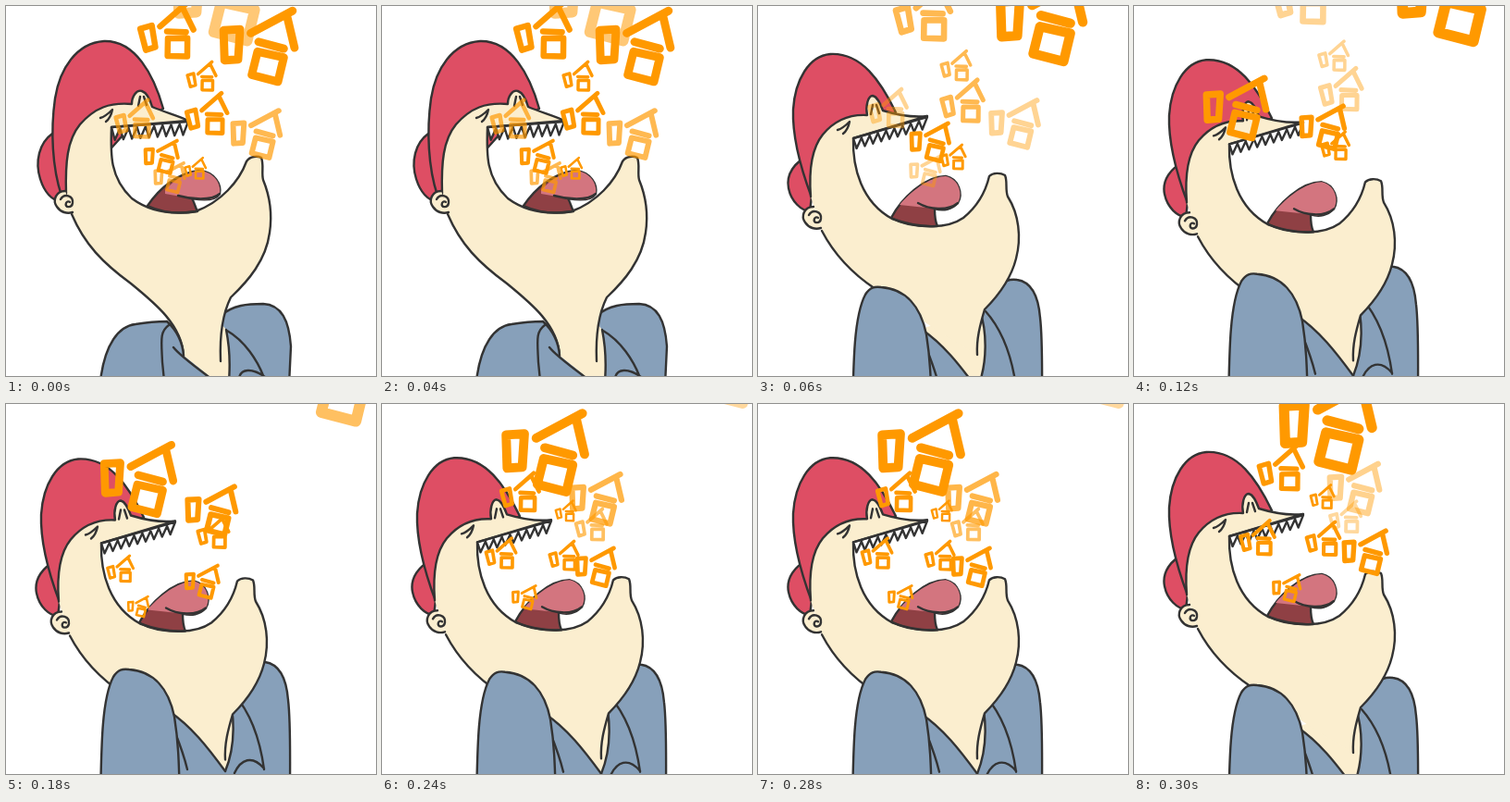
Animation, 400 px wide and 400 px high, one loop 0.36 s. Source, as an HTML page:

```html
<!DOCTYPE html>
<html lang="zh">
<head>
<meta charset="utf-8">
<title>哈哈哈</title>
<style>
  html, body { margin: 0; width: 100%; height: 100%; overflow: hidden; background: #fff; }
  svg { display: block; width: 100vw; height: 100vh; }
  .ln { fill: none; }
  .pose { stroke: #333; stroke-width: 2.4; stroke-linecap: round; stroke-linejoin: round; }
  .skin { fill: #fbeecf; }
  .red { fill: #de4e64; }
  .blue { fill: #87a0ba; }
  .dark { fill: #8f4044; }
  .pink { fill: #d3757f; }
  .white { fill: #fff; }
  .bare { stroke: none; }
  #laughs { fill: none; stroke: #ff9900; stroke-width: 8.5; stroke-linecap: round; stroke-linejoin: round; }
</style>
</head>
<body>
<svg viewBox="0 0 400 400" role="img" aria-label="哈哈哈">
  <g id="low" class="pose"></g>
  <g id="high" class="pose"></g>
  <g id="laughs"></g>
</svg>
<script>
(() => {
  const STEP = 60, COUNT = 6;
  const byId = id => document.getElementById(id);

  function add(parent, tag, attrs) {
    const el = document.createElementNS('http://www.w3.org/2000/svg', tag);
    for (const k in attrs) el.setAttribute(k, attrs[k]);
    parent.appendChild(el);
    return el;
  }
  const group = (parent, shift = '0,0') => add(parent, 'g', { transform: `translate(${shift})` });
  const draw = (parent, cls, d) => add(parent, 'path', { class: cls, d });

  function teeth(parent, x0, y0, x1, y1, n, h) {
    let d = `M${x0},${y0}`;
    for (let i = 0; i < n; i++) {
      const at = (p, drop) => `L${x0 + (x1 - x0) * p / n},${y0 + (y1 - y0) * p / n + drop}`;
      d += at(i + 0.4, h) + at(i + 1, i < n - 1 ? 2 : 0);
    }
    draw(parent, 'white', d + 'Z');
  }

  function head(g, p) {
    draw(g, 'red', p.flap);
    draw(g, 'red', p.cap);
    draw(g, 'skin bare', p.brow + p.jaw + p.base + 'L' + p.cheek);
    draw(g, 'dark', p.mouth);
    draw(g, 'pink bare', p.tongue);
    draw(g, 'ln', p.fold);
    teeth(g, ...p.teeth);
    draw(g, 'ln', p.brow + p.jaw);
    draw(g, 'ln', 'M' + p.cheek);
    const ear = group(g, p.ear);
    draw(ear, 'skin', 'M60,217 C50,217 46,227 51,234 C55,240 62,242 68,240');
    draw(ear, 'ln', 'M55,226 C59,219 69,222 68,230 C67,236 59,235 61,230 C62,228 64,228 65,229');
    draw(group(g, p.eye), 'ln', 'M86,134 C90,133 95,129 99,125 C98,130 96,135 92,138');
    draw(group(g, p.lid), 'ln', 'M122,117 L124,107 M128,107 L131,116');
  }

  // Leaning forward
  const low = byId('low');
  draw(low, 'blue', 'M232,335 C245,323 262,322 278,322 C298,323 306,340 308,368 L306,410 L225,410 Z');
  draw(low, 'skin bare', 'M230,340 L238,350 C241,365 243,380 241,405 L215,405 Z');
  draw(low, 'ln', 'M238,350 C241,365 243,380 241,405 M239,351 C258,362 272,383 279,402 M252,402 C254,392 266,391 280,401');
  head(low, {
    flap: 'M50,138 C36,148 31,168 37,187 C42,203 50,210 60,212 L66,170 Z',
    cap: 'M60,205 C50,175 48,135 53,100 C58,68 76,40 106,38 C140,37 160,75 170,111 L135,130 L66,207 Z',
    brow: 'M65,203 C64,170 66,145 80,128 C96,110 112,104 136,106 C136,98 141,90 147,92 C153,94 156,102 158,109 C172,115 188,119 197,124 L114,131',
    jaw: 'C113,160 112,185 136,208 C155,222 180,226 205,222 C232,212 252,190 260,168 C264,162 272,162 276,164 C279,172 276,180 278,188 C285,205 288,225 285,245 C281,275 262,297 243,315 C233,335 231,360 232,384',
    base: 'L240,400 L215,405',
    cheek: '192,378 C190,345 162,322 135,300 C105,278 85,258 71,225',
    mouth: 'M153,216 C165,198 185,180 210,178 C226,180 233,193 231,203 C226,211 212,210 201,208 C204,213 205,219 207,222 C188,225 168,223 153,216 Z',
    tongue: 'M172,199 C183,187 197,179 210,178 C226,180 233,193 231,203 C226,211 212,210 201,208 L172,203 Z',
    fold: 'M231,203 C222,211 200,209 186,205',
    teeth: [114, 131, 197, 125, 9, 14],
    ear: '4,-17', eye: '16,-13', lid: '21,-9'
  });
  draw(low, 'blue bare', 'M102,405 C107,365 122,346 140,344 C152,342 164,341 174,341 C186,352 192,365 192,378 C202,386 212,393 224,405 Z');
  draw(low, 'ln', 'M102,405 C107,365 122,346 140,344 C152,342 164,341 174,341 M176,345 C166,352 168,362 169,385 L171,405 M181,369 C188,378 202,388 222,403 M174,341 C186,352 191,365 192,378');

  // Leaning back
  const high = byId('high');
  const back = group(high), face = group(high), front = group(high);
  draw(back, 'blue', 'M240,330 C255,310 262,293 280,296 C294,298 303,312 305,337 C308,362 307,390 307,450 L200,450 Z');
  draw(back, 'skin bare', 'M176,349 L240,330 C247,350 249,385 237,414 Z');
  draw(back, 'ln', 'M240,330 C247,350 249,385 237,414 M246,330 C262,348 274,375 279,412 M247,416 C254,401 266,396 279,411');
  head(face, {
    flap: 'M54,163 C40,168 30,182 33,197 C36,212 47,221 56,222 L60,190 Z',
    cap: 'M58,207 C46,175 37,140 38,112 C40,80 55,54 78,52 C112,50 133,82 149,115 L110,130 L58,207 Z',
    brow: 'M57,206 C55,180 57,155 70,139 C84,122 100,117 118,118 C116,108 119,97 124,97 C129,98 132,105 135,113 C148,117 165,121 183,119 L103,143',
    jaw: 'C102,175 112,212 145,230 C175,241 205,241 222,229 C238,216 246,201 250,184 C254,180 262,180 267,183 C270,190 267,198 270,206 C282,225 285,250 279,273 C273,297 258,315 245,328 C240,345 236,360 237,377',
    base: 'L200,355',
    cheek: '127,306 C100,288 82,268 69,243',
    mouth: 'M144,229 C155,208 180,184 203,184 C217,187 222,203 216,213 C210,220 200,222 191,219 C191,226 191,232 194,238 C175,239 158,237 144,229 Z',
    tongue: 'M153,215 C170,195 190,184 203,184 C217,187 222,203 216,213 C208,221 195,221 191,219 L153,215 Z',
    fold: 'M216,213 C205,222 185,220 173,213',
    teeth: [103, 143, 183, 120, 9, 12],
    ear: '0,0', eye: '0,0', lid: '0,0'
  });
  draw(front, 'blue bare', 'M176,349 C200,365 218,388 237,414 L237,450 L170,450 Z');
  draw(front, 'ln', 'M176,349 C200,365 218,388 237,414 M182,370 C188,385 192,395 196,412');
  draw(front, 'blue', 'M102,450 C103,380 104,335 116,312 C121,304 126,303 133,304 C160,306 176,325 182,355 C186,380 187,400 188,450 Z');

  // Each laugh flies straight while growing, then drifts on slowly and fades.
  const GLYPH = 'M-36,-16 L-19,-17 L-21,14 L-35,15 Z M-8,-13 L35,-36 M29,-32 L37,2 ' +
    'M0,-4 L26,3 M-1,6 L26,12 L20,37 L-7,30 Z';
  const GROW = 0.16, FADE = 0.62, FAINTEST = 0.36, DRIFT_X = 0.35, DRIFT_Y = 0.7;
  const SKIP = 0.6; // the loop jumps a little ahead where it restarts
  const TILT = -13;
  const laughs = [];

  function laugh(start, x, y, vx, vy, size, { tilt = 0, fly = 2.8 } = {}) {
    const el = draw(byId('laughs'), 'ha', GLYPH);
    laughs.push({ el, start, x, y, vx, vy, size, tilt, fly });
  }
  laugh(2, 110, 110, 33, -29, 0.88, { fly: 3.3 });
  laugh(0, 273, 43, 33, -28, 1.05, { fly: 2 });
  laugh(0, 168, 163, 18, -16, 0.48, { fly: 3.3 });
  laugh(3, 212, 192, 19, -16, 0.48);
  laugh(0, 205, 177, 6.5, -12, 0.3, { fly: 3, tilt: TILT });
  laugh(3, 124, 180, 5, -16.5, 0.37, { tilt: TILT });
  laugh(3, 143, 219, 11, -10, 0.3);
  laugh(4, 150, 98, 9.5, -26, 0.54, { tilt: TILT });
  laugh(4, 199, 117, 5, -15, 0.29, { tilt: TILT });
  laugh(4, 197, 166, 8, -18, 0.41, { tilt: TILT });

  function place(l, step) {
    const age = step < l.start ? step + COUNT + SKIP - l.start : step - l.start;
    const run = Math.min(age, l.fly), rest = age - run;
    const alpha = FADE ** rest;
    l.el.style.display = alpha < FAINTEST ? 'none' : '';
    const x = l.x + l.vx * (run + DRIFT_X * rest);
    const y = l.y + l.vy * (run + DRIFT_Y * rest);
    const s = l.size * (1 + GROW * run);
    l.el.setAttribute('transform', `translate(${x},${y}) rotate(${l.tilt}) scale(${s})`);
    l.el.setAttribute('opacity', alpha);
  }

  function show(step) {
    low.style.display = step === 0 ? '' : 'none';
    high.style.display = step === 0 ? 'none' : '';
    const bob = Math.sqrt(Math.max(0, Math.sin(Math.PI * (step - 1) / 4)));
    const shift = (g, y) => g.setAttribute('transform', `translate(0,${y})`);
    shift(face, 7.5 * bob);
    shift(back, -17 * bob);
    shift(front, -17 * bob);
    for (const l of laughs) place(l, step);
  }

  function tick() {
    show(Math.floor((performance.now() + 0.5) / STEP) % COUNT);
    requestAnimationFrame(tick);
  }
  tick();
})();
</script>
</body>
</html>
```
